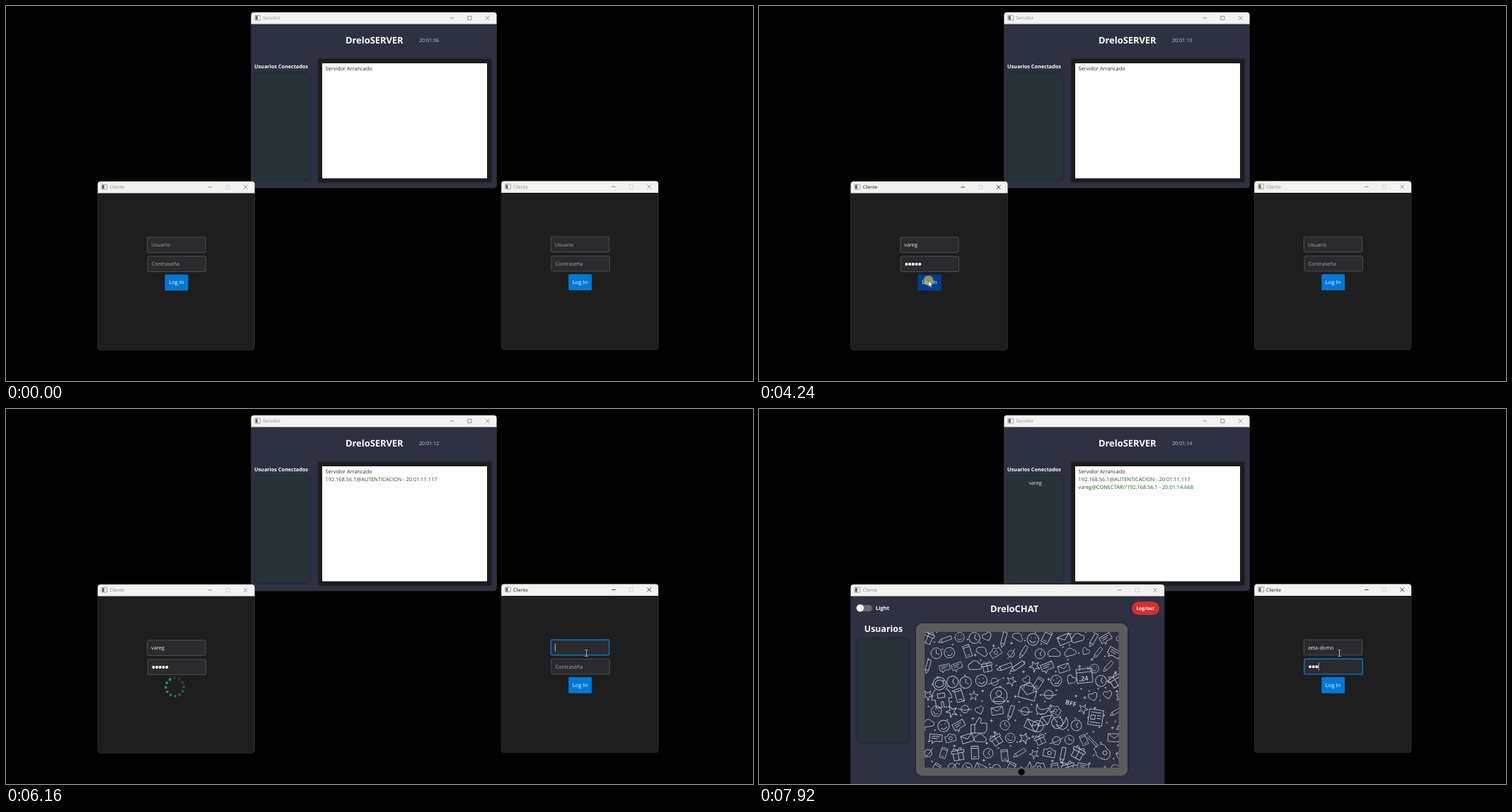
Recreate the animation shown at these times as an HTML page. Size 1056 px wide and 530 px high, loop 7990 ms.

```html
<!DOCTYPE html>
<html lang="es">
<head>
<meta charset="utf-8">
<title>Servidor y clientes</title>
<style>
html, body { margin: 0; width: 100%; height: 100%; overflow: hidden; background: #000; }
svg { display: block; width: 1056px; height: 530px; }
text { font-family: "Open Sans", "Noto Sans", sans-serif; text-rendering: geometricPrecision; white-space: pre; }
.b { font-weight: 700; }
.m { text-anchor: middle; }
.name { fill: #8c8c8c; }
.ctl { stroke: #7d7d7d; stroke-width: .8; fill: none; }
.off { stroke: #cfcfcf; }
.active .name { fill: #151515; }
.active .ctl:not(.off) { stroke: #111; }
.box { fill: #2b2b2d; stroke: #4c4c4f; stroke-width: 1; }
.focus .box { stroke: #0078d7; stroke-width: 1.4; }
.value { fill: #f0f0f0; }
.prompt .value { fill: #a6a6a6; }
.caret { fill: #d8d8d8; }
.log { fill: #1c651c; }
.doodle { fill: none; stroke: #b4b8c6; stroke-width: 1; stroke-linecap: round; stroke-linejoin: round; }
.doodle text { fill: #b4b8c6; stroke: none; }
</style>
</head>
<body>
<svg id="stage" viewBox="0 0 1056 530"></svg>
<script>
const LOOP = 7990;
const LEFT_USER = 'vareg', RIGHT_USER = 'zeta-domo';
const stage = document.getElementById('stage');

const rect = (x, y, w, h, fill, r = 0, more = '') =>
  `<rect x="${x}" y="${y}" width="${w}" height="${h}" rx="${r}" fill="${fill}" ${more}/>`;
const label = (x, y, size, str, fill = '#fff', cls = '', id = '') =>
  `<text x="${x}" y="${y}" font-size="${size}" fill="${fill}" class="${cls}" id="${id}">${str}</text>`;

function frame(x, y, w, h, title, body, noMax) {
  const cy = y + 8, right = x + w;
  return rect(x, y, w, h, body, 4, 'stroke="#303034" stroke-width=".8"') +
    `<path d="M${x} ${y + 16.5}v-12.5q0-4 4-4h${w - 8}q4 0 4 4v12.5z" fill="#f2f2f1"/>` +
    rect(x + 5.5, y + 4.3, 7.6, 6.8, '#fafafa', .5, 'stroke="#8a8a8a" stroke-width=".8"') +
    rect(x + 6.3, y + 5.2, 3, 5.2, '#666') +
    label(x + 16.8, y + 10.3, 6.4, title, '', 'name') +
    `<path class="ctl" d="M${right - 66} ${cy}h5.6M${right - 15.6} ${cy - 2.8}l5.6 5.6m0-5.6l-5.6 5.6"/>` +
    `<path class="ctl ${noMax ? 'off' : ''}" d="M${right - 40.8} ${cy - 2.6}h5.2v5.2h-5.2z"/>`;
}

const field = (cls, x, y) => `<g class="${cls}">` +
  rect(x, y, 82.4, 21.6, '', 1.5, 'class="box"') +
  label(x + 5.6, y + 13.5, 7.3, '', '', 'value') +
  [0, 1, 2, 3, 4].map(i => `<circle class="dot" cx="${x + 8.2 + 4.7 * i}" cy="${y + 11}" r="2.05" fill="#f2f2f2"/>`).join('') +
  rect(x + 6, y + 5.2, .8, 11, '', 0, 'class="caret"') + '</g>';

const client = (id, dx, dy) => `<g id="${id}" transform="translate(${dx} ${dy})">` +
  frame(129.7, 248, 221.8, 238.2, 'Cliente', '#1e1e1e', true) +
  `<g class="msg">${label(241.2, 321, 6.45, 'Login con éxito', '#e0e8e4', 'm')}</g>` +
  field('user', 199.7, 326.8) + field('pass', 200.3, 353.9) +
  `<g class="login">${rect(224.6, 379.5, 32.9, 22.8, '#0078d7', 1.5)}${label(241, 393.4, 7.6, 'Log In', '#fff', 'm')}</g></g>`;

const server = `<g>${frame(346.5, 9, 347, 248, 'Servidor', '#2e3142')}
  ${label(520.8, 53, 12.9, 'DreloSERVER', '#fff', 'b m')}
  ${label(584, 50.8, 7.2, '', '#c3c6d2', '', 'clock')}
  ${label(351, 88, 7.28, 'Usuarios Conectados', '#fff', 'b')}
  ${rect(352, 94, 78, 152, '#253136', 5, 'filter="url(#soft)"')}
  ${label(390.6, 107, 7.2, '', '#e8e8e8', 'm', 'online')}
  ${rect(441.5, 75, 244.5, 174, '#1e1e1e', 1, 'filter="url(#soft)"')}
  ${rect(447, 81, 233, 162.5, '#fdfdfd')}
  ${label(451.5, 91.4, 7.35, 'Servidor Arrancado', '#2b2b2b')}
  ${label(451.5, 102.4, 7.4, '192.168.56.1@AUTENTICACION - 20:01:11.117', '', 'log', 'log1')}
  ${label(451.5, 113.4, 7.4, LEFT_USER + '@CONECTAR//192.168.56.1 - 20:01:14.668', '', 'log', 'log2')}</g>`;

const ring = r => `M${-r} 0a${r} ${r} 0 1 0 ${2 * r} 0a${r} ${r} 0 1 0 ${-2 * r} 0`;
const small = {
  smile: ring(8) + 'M-4 2q4 5 8 0M-3-3v1M3-3v1',
  heart: 'M0 6C-12-2-5-9 0-4C5-9 12-2 0 6Z',
  bubble: 'M-9-6h18v10h-10l-4 4v-4h-4zM-6-3h11M-6 0h8',
  mail: 'M-9-6h18v12h-18zl9 7 9-7',
  watch: ring(8) + 'M0-5v5l4 2',
  camera: 'M-9-5h5l2-3h4l2 3h5v11h-18z' + ring(3),
  planet: ring(6) + 'M-10 4Q0 3 10-4',
  star: 'M0-8l2 5h6l-5 4 2 6-5-4-5 4 2-6-5-4h6z',
  phone: 'M-5-9h10v18h-10zM-2 6h4M-5-6h10',
  cloud: 'M-7 5h13a4 4 0 0 0 0-8a6 6 0 0 0-11-1a5 5 0 0 0-2 9z',
  pencil: 'M-9 9l2-6L5-9l4 4L-3 7zM-7 3l4 4',
  banana: 'M-9-3Q-2 8 9-7Q10 9-3 8Q-8 5-9-3z',
  gift: 'M-7-2h14v10h-14zM-9-6h18v4h-18zM0-6v14M0-6q-6-6-6-1M0-6q6-6 6-1'
};
const big = {
  astronaut: 'M-9-14a9 9 0 1 1 18 0a9 9 0 1 1-18 0M-6-14a6 5 0 1 1 12 0a6 5 0 1 1-12 0M-7-6q-6 4-7 14h5v12h8v-8h3v8h8v-12h5q-1-10-7-14M-5 0h10v6h-10z',
  bike: 'M-22 5a8 8 0 1 0 16 0a8 8 0 1 0-16 0M6 5a8 8 0 1 0 16 0a8 8 0 1 0-16 0M-14 5L-6-7H8L0 5zM-8-11h5M-6-7l6 12M14 5L7-12h5',
  guitar: 'M-18-18l14 14M-16-20l14 14M-4-6q-8 4-2 8q0 8 8 10q8 4 12-3q2-8-5-11q-2-8-9-6M4 4a3 3 0 1 0 6 0a3 3 0 1 0-6 0',
  person: ring(12) + 'M-4-3a4 4 0 1 0 8 0a4 4 0 1 0-8 0M-8 8q0-6 8-6t8 6z',
  thumb: 'M-11-1h5v12h-5zM-6 0L0-11q5 0 2 8h9v10l-3 4H-6',
  letter: 'M-12-5L0-14l12 9v15h-24zl12 9 12-9M-7-4v-5h14v5',
  calendar: 'M-11-10h22v20h-22zM-11-5h22M-6-12v4M6-12v4',
  news: 'M-10-11h20v22h-20zM-7-7h14M-7-3h6v6h-6zM2-3h5M2 1h5M-7 7h14'
};

function wallpaper() {
  let seed = 41;
  const rnd = () => (seed = seed * 16807 % 2147483647) / 2147483647;
  const taken = [];
  const put = (d, x, y, turn, size) => {
    taken.push([x, y]);
    return `<path transform="translate(${x} ${y}) rotate(${turn}) scale(${size})" d="${d}"/>`;
  };
  const far = (x, y, d) => taken.every(p => Math.hypot(p[0] - x, p[1] - y) > d);
  let out = [
    ['astronaut', 257, 402, -8], ['bike', 407, 441, -10], ['guitar', 482, 482, 0], ['person', 339, 405, 0],
    ['thumb', 311, 447, 0], ['letter', 380, 400, 15], ['calendar', 460, 377, -6], ['news', 476, 436, 8]
  ].map(([k, x, y, turn]) => put(big[k], x, y, turn, 1)).join('');
  out += label(0, 0, 9, '24', '', 'b m').replace('<text', '<text transform="translate(460.5 384) rotate(-6)"');
  out += label(0, 0, 9, 'BFF', '', 'b m').replace('<text', '<text transform="translate(440 419) rotate(15)"');
  taken.push([440, 416]);
  const kinds = Object.values(small);
  for (let row = 0; row < 10; row++) for (let col = 0; col < 14; col++) {
    const x = 238 + col * 21 + (row % 2) * 10 + rnd() * 5, y = 321 + row * 20.5 + rnd() * 5;
    const kind = kinds[Math.floor(rnd() * kinds.length)], turn = rnd() * 70 - 35;
    if (far(x, y, 17)) out += put(kind, x, y, turn, .78 + rnd() * .25);
  }
  for (let i = 0; i < 420; i++) {
    const x = 234 + rnd() * 274, y = 315 + rnd() * 192;
    if (far(x, y, 9.5)) out += put(i % 3 ? ring(.7) : 'M-1.6 0h3.2M0-1.6v3.2', x, y, 0, 1);
  }
  return out;
}

const chat = `<g id="chat">${frame(129.7, 248, 443.3, 300, 'Cliente', '#2e3142', true)}
  ${rect(141, 277, 19, 9, '#6a6a6c', 4.5)}<circle cx="143" cy="281.3" r="5.3" fill="#fafafa"/>
  ${label(165, 284, 7.5, 'Light', '#fff', 'b')}
  ${label(361, 286.7, 12.9, 'DreloCHAT', '#fff', 'b m')}
  ${rect(527, 272.3, 39, 18.8, '#d32f2f', 9.4)}${label(546.3, 284, 6.6, 'Log/out', '#fff', 'b m')}
  ${label(176, 314.7, 12.4, 'Usuarios', '#fff', 'b m')}
  ${rect(138.5, 324.5, 73.5, 147, '#253136', 6, 'filter="url(#soft)"')}
  ${rect(222, 303, 299, 215.5, '#5b5b5b', 9, 'filter="url(#soft)"')}
  ${rect(234, 315, 274.5, 192, '#2e3142')}
  <g class="doodle" clip-path="url(#screen)">${wallpaper()}</g>
  <circle cx="371" cy="513" r="4.6" fill="#000"/></g>`;

stage.innerHTML = `<defs>
  <filter id="soft" x="-10%" y="-10%" width="120%" height="120%"><feDropShadow dx="0" dy="0" stdDeviation="1.8" flood-opacity=".55"/></filter>
  <clipPath id="screen">${rect(234, 315, 274.5, 192, '#000')}</clipPath></defs>` +
  server + client('left', 0, 0) + client('right', 570.6, -.6) +
  '<g id="spinner" fill="#22a04a">' + '<circle cx="12.7" r="2"/>'.repeat(12) + '</g>' + chat +
  `<g id="mouse"><circle id="press" r="7" fill="#dccf48" opacity=".62"/>
  <path id="arrow" d="M0 0v9l2.1-1.9 1.4 3 1.4-.7-1.4-2.9h2.9z" fill="#fff" stroke="#222" stroke-width=".5"/>
  <path id="beam" d="M-2-4.5h1.5l.5.5.5-.5H2M0-4v8M-2 4.5h1.5l.5-.5.5.5H2" fill="none" stroke="#d5d5d5" stroke-width=".8"/></g>`;

const $ = sel => document.querySelector(sel);
const show = (el, on) => { el.style.display = on ? '' : 'none'; };
const within = (t, a, b) => t >= a && t < b;
const typed = (keys, t) => keys.filter(k => t >= k).length;

const ticks = [760, 1760, 2770, 3770, 4780, 5880, 6850, 7850];
const keys = {
  leftUser: [1430, 1560, 1690, 1970, 2170],
  leftPass: [2770, 2870, 2970, 3070, 3170],
  rightUser: [6300, 6430, 6570, 6710, 6850, 6980, 7050, 7120, 7190],
  rightPass: [7650, 7850, 7850]
};
const route = [
  [130, 838, 507], [620, 239, 341], [3690, 239, 341], [3980, 239.5, 388], [4370, 239.5, 388],
  [4790, 821.5, 346], [5050, 821.5, 346], [5400, 820.5, 345], [LOOP, 820.5, 345]
];

function mouseAt(t) {
  const i = Math.max(1, route.findIndex(p => p[0] > t));
  const [t0, x0, y0] = route[i - 1], [t1, x1, y1] = route[i];
  const u = (t - t0) / (t1 - t0), e = u * u * (3 - 2 * u);
  return [x0 + (x1 - x0) * e, y0 + (y1 - y0) * e];
}

function setField(sel, prompt, value, dots, focus, caretOn) {
  const g = $(sel), text = g.querySelector('.value'), box = g.querySelector('.box');
  const empty = !value && !dots;
  g.classList.toggle('focus', focus);
  g.classList.toggle('prompt', empty);
  text.textContent = empty ? (focus ? '' : prompt) : value;
  g.querySelectorAll('.dot').forEach((d, i) => show(d, i < dots));
  const caret = g.querySelector('.caret');
  show(caret, focus && caretOn);
  const advance = value ? text.getComputedTextLength() : dots * 4.7;
  caret.setAttribute('x', +box.getAttribute('x') + 5.8 + advance);
}

function drawSpinner(t) {
  const g = $('#spinner'), step = Math.floor((t - 4980) / 100), turn = -(t - 4990) * 360 / 3900;
  g.setAttribute('transform', `translate(238.6 393) rotate(${15 + turn})`);
  [...g.children].forEach((dot, i) => {
    const age = (((step - i) % 12) + 12) % 12;
    dot.setAttribute('transform', `rotate(${30 * i})`);
    dot.setAttribute('opacity', 1 - age * .068);
  });
}

function draw(t) {
  const [base, step] = t < 4236 ? [130, 70] : [4236, 68.4];
  const q = base + Math.floor((t - base) / step) * step;

  $('#clock').textContent = '20:01:' + String(6 + typed(ticks, t)).padStart(2, '0');
  const joined = t >= 7920;
  show($('#log1'), t >= 4370);
  show($('#log2'), joined);
  $('#online').textContent = joined ? LEFT_USER : '';
  show($('#left'), !joined);
  show($('#chat'), joined);
  $('#left').classList.toggle('active', within(t, 690, 4850));
  $('#right').classList.toggle('active', t >= 4850);

  setField('#left .user', 'Usuario', LEFT_USER.slice(0, typed(keys.leftUser, t)), 0,
    within(t, 690, 2300), !within(t, 1360, 1430));
  setField('#left .pass', 'Contraseña', '', typed(keys.leftPass, t), within(t, 2300, 4240), t < 3700);
  setField('#right .user', 'Usuario', RIGHT_USER.slice(0, typed(keys.rightUser, t)), 0,
    within(t, 4850, 7310), !within(t, 5350, 5850));
  setField('#right .pass', 'Contraseña', '', typed(keys.rightPass, t), t >= 7310, true);

  const busy = within(t, 4310, 6780);
  show($('#spinner'), busy);
  if (busy) drawSpinner(q);
  show($('#left .login'), !busy);
  show($('#left .msg'), t >= 6780);
  show($('#right .msg'), false);
  $('#left .login rect').setAttribute('fill',
    within(t, 4240, 4310) ? '#003f91' : within(t, 3910, 4240) ? '#0063b5' : '#0078d7');

  show($('#mouse'), t >= 130);
  if (t < 130) return;
  const [x, y] = mouseAt(q);
  const overField = (x > 199 && x < 283 || x > 770 && x < 854) && y > 326 && y < 376;
  $('#mouse').setAttribute('transform', `translate(${x} ${y})`);
  show($('#beam'), overField);
  show($('#arrow'), !overField);
  show($('#press'), within(t, 690, 830) || within(t, 4240, 4370) || within(t, 4850, 4980));
}

const start = performance.now();
function tick() {
  draw((performance.now() - start) % LOOP);
  requestAnimationFrame(tick);
}
tick();
</script>
</body>
</html>
```
